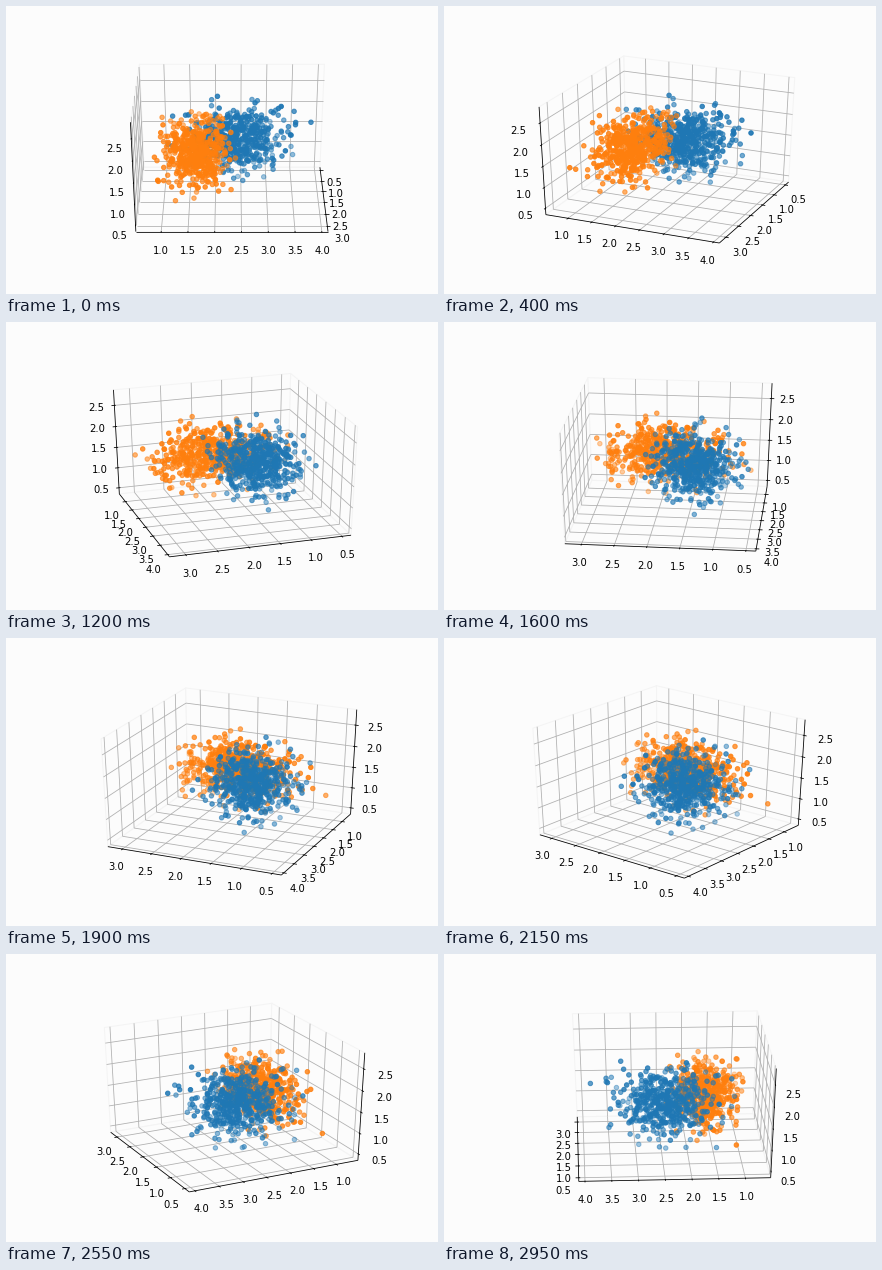
These frames come from a looping animation (432 px wide and 288 px high, 3 s). A matplotlib script:

```python
import numpy as np
import matplotlib.pyplot as plt
from matplotlib.animation import FuncAnimation
from matplotlib.collections import LineCollection, PolyCollection
from matplotlib.colors import to_rgb

W, H, DPI = 432, 288, 72
FRAMES, STEP_MS, DEG_PER_FRAME = 60, 50, 3
BG = "#fcfcfc"

# Perspective camera: 10 units from the centre of a unit cube, 30 degrees up
DIST, ELEV = 10, np.radians(30)
CENTER = np.array([225.92, 147.66])
SCALE = np.array([334.8, 217.44]) / 0.185

DELTA = 1 / 12
EDGE = 0.5 + DELTA / 4
LABEL = EDGE + DELTA
DATA_MAX = 0.5 / 1.1

# Per axis: centre and span of the data range, first and last tick
AXES = [(1.802, 2.787, 0.5, 3.0), (2.321, 3.446, 1.0, 4.0), (1.601, 2.415, 0.5, 2.5)]


def project(p, azim):
    """Cube coordinates to pixels, plus distance from the camera."""
    x, y, z = np.moveaxis(np.asarray(p, float), -1, 0)
    s, c = np.sin(azim), np.cos(azim)
    right, toward = c * y - s * x, c * x + s * y
    up = np.cos(ELEV) * z - np.sin(ELEV) * toward
    depth = DIST - np.cos(ELEV) * toward - np.sin(ELEV) * z
    xy = np.stack([right, up], -1) / depth[..., None]
    return CENTER + SCALE * xy, depth


fig = plt.figure(figsize=(W / DPI, H / DPI), dpi=DPI, facecolor=BG)
ax = fig.add_axes([0, 0, 1, 1])
ax.set(xlim=(0, W), ylim=(0, H))
ax.axis("off")


def lines(color, lw, z):
    return ax.add_collection(LineCollection([], colors=color, lw=lw, zorder=z))


panes = ax.add_collection(PolyCollection([], facecolor=BG, edgecolor="#f4f4f4", lw=1, zorder=0))
grid = lines("#b0b0b0", 0.8, 1)
spines = lines("k", 0.8, 1.5)
ticks = lines("k", 0.8, 1.6)

tick_vals = [np.arange(lo, hi + 0.1, 0.5) for _, _, lo, hi in AXES]
tick_pos = [(v - a[0]) / a[1] for v, a in zip(tick_vals, AXES)]
labels = [[ax.text(0, 0, f"{v:.1f}", size=10, family="DejaVu Sans", ha="center", va="top")
           for v in vals] for vals in tick_vals]

rng = np.random.default_rng(4)


def cloud(color, mean, sd, n=500):
    """Normal cluster in cube coordinates, kept inside the data range."""
    pts = rng.normal(mean, sd, (2 * n, 3))
    pts = pts[np.abs(pts).max(axis=1) < DATA_MAX][:n]
    art = ax.scatter(pts[:, 0], pts[:, 1], s=20, lw=1)
    return art, pts, to_rgb(color)


clouds = [cloud("#1f77b4", (-0.14, 0.03, 0.0), (0.108, 0.122, 0.14)),
          cloud("#ff7f0e", (0.05, -0.205, -0.02), (0.165, 0.085, 0.128))]


def with_axis(p, i, value):
    q = np.array(p, float)
    q[i] = value
    return q


def flip(p, *axes):
    q = np.array(p, float)
    q[list(axes)] *= -1
    return q


def draw_box(azim):
    # Corner where the three back panes meet
    far = EDGE * np.array([-1 if np.cos(azim) > 0 else 1, -1, -1])

    quads = [[far, flip(far, a), flip(far, a, b), flip(far, b)]
             for a, b in ((1, 2), (0, 2), (0, 1))]
    panes.set_verts(list(project(quads, azim)[0]))

    grid_segs, spine_segs, tick_segs = [], [], []
    # Each axis sits on the edge flipped along its tick direction
    for i, tick_dir in enumerate((1, 0, 0)):
        edge = flip(far, tick_dir)
        spine_segs.append([edge, flip(edge, i)])
        out = np.sign(edge[tick_dir]) * DELTA
        for pos, label in zip(tick_pos[i], labels[i]):
            back = with_axis(far, i, pos)
            grid_segs += [[back, flip(back, j)] for j in range(3) if j != i]
            tick = with_axis(edge, i, pos)
            tick_segs.append([with_axis(tick, tick_dir, edge[tick_dir] + k * out)
                              for k in (-0.1, 0.2)])
            at = with_axis(edge * LABEL / EDGE, i, pos)
            label.set_position(project(at, azim)[0])

    for art, segs in ((grid, grid_segs), (spines, spine_segs), (ticks, tick_segs)):
        art.set_segments(list(project(segs, azim)[0]))


def draw_clouds(azim):
    for art, pts, rgb in clouds:
        xy, depth = project(pts, azim)
        # Far points fade to 30 %
        key = -DIST / depth
        alpha = 1 - 0.7 * (key - key.min()) / np.ptp(key)
        rgba = np.column_stack([np.tile(rgb, (len(pts), 1)), alpha])
        art.set_offsets(xy)
        art.set_facecolor(rgba)
        art.set_edgecolor(rgba)
        # The cloud with the nearest point goes on top
        art.set_zorder(20 - depth.min())


def update(i):
    azim = np.radians(DEG_PER_FRAME * i)
    draw_box(azim)
    draw_clouds(azim)
    return []


anim = FuncAnimation(fig, update, frames=FRAMES, interval=STEP_MS, repeat=True, repeat_delay=0)
plt.show()
```
